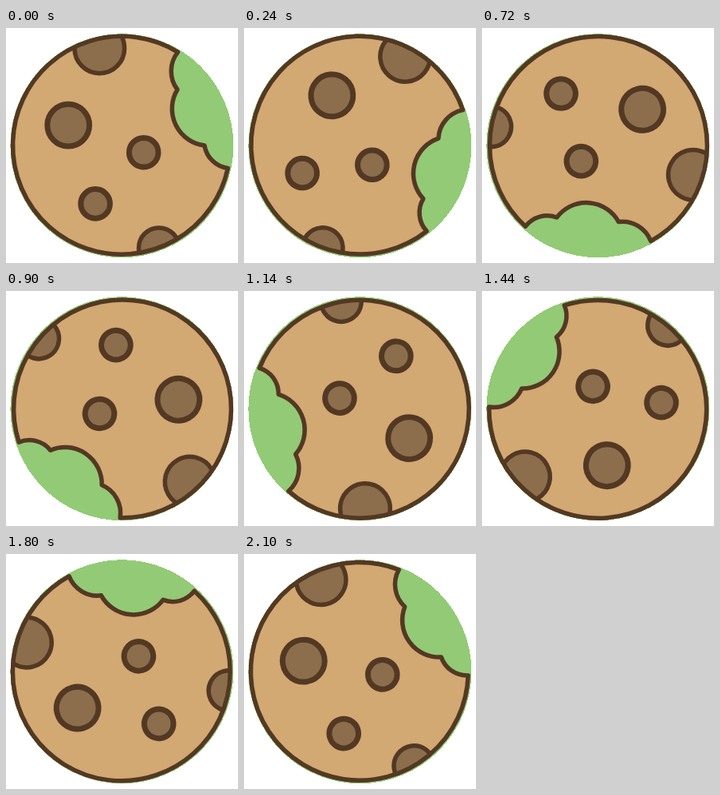
An HTML page for the animation above (2.16 s loop, 291 px wide and 294 px high).

```html
<!DOCTYPE html>
<html lang="en">
<head>
<meta charset="utf-8">
<title>Rolling cookie</title>
<style>
  html, body { margin: 0; width: 100%; height: 100%; overflow: hidden; background: #fff; }
  svg { display: block; width: 291px; height: 294px; }
  .line { stroke: #533823; stroke-linejoin: round; }
  .chip { fill: #8c6e4c; }
</style>
</head>
<body>
<svg viewBox="0 0 291 294">
  <defs>
    <clipPath id="dough"><circle cx="-.4" cy="-.5" r="136.4"/></clipPath>
  </defs>
  <g transform="translate(145.4 147.2)">
    <circle r="140" fill="#93ca76" shape-rendering="crispEdges"/>
    <g id="cookie">
      <path id="body" fill="#d2a873"/>
      <g id="chips" clip-path="url(#dough)"></g>
      <path id="rim" class="line" fill="none" stroke-width="5.5"/>
    </g>
  </g>
</svg>
<script>
  const STEP_MS = 60, STEPS = 36;
  const $ = id => document.getElementById(id);

  // Long way round the edge, then three scalloped bite marks.
  const outline = 'M132.9 28.2 A136.4 136.4 0 1 1 70.2 -117.1' +
    ' A38 38 0 0 0 69.6 -70.2 A46.3 46.3 0 0 0 103.6 -.2 A34 34 0 0 0 132.9 28.2Z';
  $('body').setAttribute('d', outline);
  $('rim').setAttribute('d', outline);

  function addChip(cx, cy, r, width) {
    const chip = document.createElementNS('http://www.w3.org/2000/svg', 'circle');
    const attrs = { class: 'chip line', cx, cy, r, 'stroke-width': width };
    for (const name in attrs) chip.setAttribute(name, attrs[name]);
    $('chips').append(chip);
  }
  addChip(-67.2, -25.6, 26.4, 7);
  addChip(27.3, 8.5, 18.3, 7);
  addChip(-33.3, 72.7, 18.3, 7);
  addChip(-28.1, -121.8, 31.3, 5.5);
  addChip(46.4, 128, 25.3, 5.5);

  function render(ms) {
    const step = Math.floor(ms / STEP_MS) % STEPS;
    $('cookie').setAttribute('transform', `rotate(${step * 360 / STEPS})`);
  }

  let start;
  function tick(now) {
    start ??= now;
    render(now - start);
    requestAnimationFrame(tick);
  }
  render(0);
  requestAnimationFrame(tick);
</script>
</body>
</html>
```
